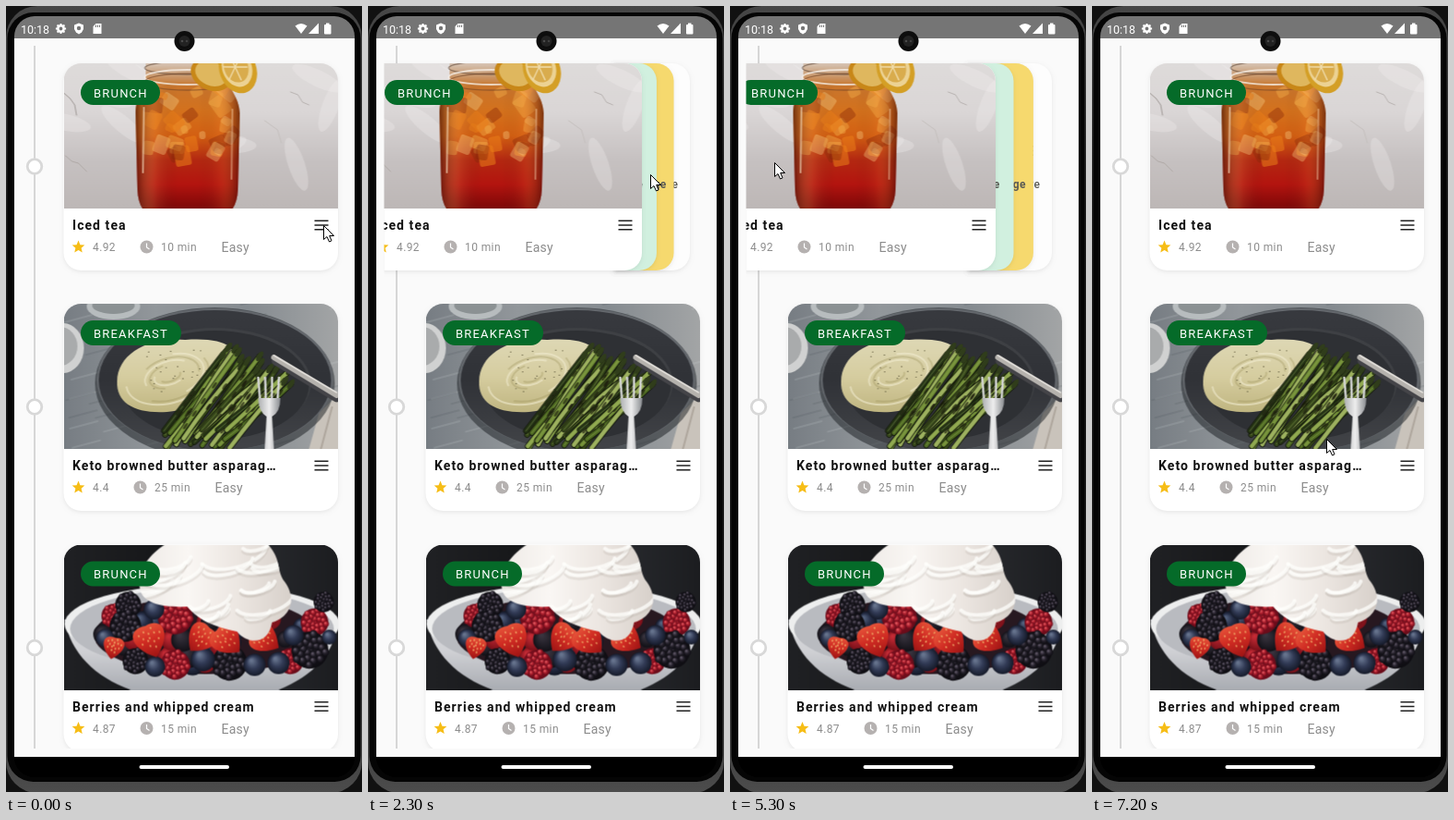
Animation of 386 by 850 pixels, one loop 7.3 s. Source, as an HTML page with a canvas:

```html
<!DOCTYPE html>
<html lang="en">
<head>
<meta charset="utf-8">
<title>Recipe timeline</title>
<style>
html, body { margin: 0; width: 100%; height: 100%; overflow: hidden; background: #111; }
canvas { display: block; width: 386px; height: 850px; }
</style>
</head>
<body>
<canvas id="stage" width="386" height="850"></canvas>
<script>
const LOOP = 7300, STEP = 100;
const PW = 298, PH = 157;
const FONT = 'Roboto, Arial, sans-serif';
const stage = document.getElementById('stage').getContext('2d');
let c = stage;

// [ms, pixels the first card is swiped]
const swipe = [[0, 0], [200, 0], [800, 102], [1000, 152], [1200, 178], [1400, 184],
  [2200, 184], [2300, 63], [2400, 16], [2500, 0], [3300, 0], [3700, 132], [3900, 180], [4000, 184],
  [5200, 184], [5300, 72], [5400, 20], [5500, 0], [5700, 0], [6000, 125], [6200, 180], [6300, 184],
  [6600, 184], [6700, 68], [6800, 18], [6900, 0]];
// [ms, x, y] of the pointer tip
const pointer = [[0, 344, 237], [100, 344, 237], [800, 167, 243], [1000, 112, 240], [1500, 110, 236],
  [1900, 150, 225], [2200, 306, 183], [2300, 306, 182], [2600, 306, 182], [3100, 325, 166],
  [3300, 322, 166], [3800, 178, 170], [4100, 178, 170], [4800, 60, 162], [5000, 48, 169],
  [5300, 48, 169], [5650, 290, 166], [6100, 185, 168], [6400, 217, 167], [6600, 217, 167], [7200, 254, 468]];

function track(keys, t, i) {
  for (let k = 1; k < keys.length; k++) {
    const a = keys[k - 1], b = keys[k];
    if (t <= b[0]) return a[i] + (b[i] - a[i]) * (t - a[0]) / (b[0] - a[0]);
  }
  return keys[keys.length - 1][i];
}

function seeded(s) {
  return () => (s = (s * 16807) % 2147483647) / 2147483647;
}

function fill(color) { c.fillStyle = color; c.fill(); }
function stroke(color, w) { c.strokeStyle = color; c.lineWidth = w; c.stroke(); }
function box(x, y, w, h, r, color) {
  c.beginPath(); c.roundRect(x, y, w, h, r);
  if (color) fill(color);
}
function oval(x, y, rx, ry, color, rot = 0) {
  c.beginPath(); c.ellipse(x, y, rx, ry, rot, 0, 7);
  if (color) fill(color);
}
function line(color, w, ...p) {
  c.beginPath(); c.moveTo(p[0], p[1]);
  for (let i = 2; i < p.length; i += 2) c.lineTo(p[i], p[i + 1]);
  stroke(color, w);
}
function poly(color, ...p) {
  c.beginPath(); c.moveTo(p[0], p[1]);
  for (let i = 2; i < p.length; i += 2) c.lineTo(p[i], p[i + 1]);
  c.closePath(); fill(color);
}
function stops(g, colors) {
  colors.forEach((s, i) => g.addColorStop(i / (colors.length - 1), s));
  return g;
}
function down(y0, y1, ...colors) { return stops(c.createLinearGradient(0, y0, 0, y1), colors); }
function across(x0, x1, ...colors) { return stops(c.createLinearGradient(x0, 0, x1, 0), colors); }
function ball(x, y, r, ...colors) {
  oval(x, y, r, r, stops(c.createRadialGradient(x - r * .3, y - r * .4, r * .1, x, y, r), colors));
}
function text(s, x, y, size, weight, color, gap) {
  c.font = `${weight} ${size}px ${FONT}`;
  c.letterSpacing = gap + 'px';
  c.fillStyle = color;
  c.fillText(s, x, y);
}

function photo(paint) {
  const cv = document.createElement('canvas');
  cv.width = PW; cv.height = PH;
  c = cv.getContext('2d');
  c.lineCap = 'round';
  paint();
  c = stage;
  return cv;
}

function paintTea() {
  const rnd = seeded(12);
  c.fillStyle = down(0, PH, '#dedbda', '#dad6d6', '#c6c1c1', '#bdb7b6');
  c.fillRect(0, 0, PW, PH);
  for (let i = 0; i < 12; i++) oval(rnd() * PW, rnd() * 110, 30, 9, 'rgba(240,238,238,.3)', rnd() * 3);
  line('#9e9895', 1, 0, 32, 7, 38, 12, 45, 14, 56);
  line('#b0aaa7', 1, 2, 100, 9, 106, 16, 108, 25, 117);
  line('#b9b4b2', 1, 246, 31, 254, 34, 259, 42, 266, 45);
  line('#c5c0be', 1, 218, 62, 232, 72, 236, 86);

  // jar
  c.save();
  c.beginPath();
  c.moveTo(89, 0); c.lineTo(89, 20);
  c.bezierCurveTo(87, 31, 78, 36, 78, 54);
  c.lineTo(80, 136); c.quadraticCurveTo(81, 157, 91, 162);
  c.lineTo(178, 162); c.quadraticCurveTo(188, 156, 189, 136);
  c.lineTo(191, 54);
  c.bezierCurveTo(190, 36, 181, 32, 180, 20);
  c.lineTo(180, 0); c.clip();
  c.fillStyle = down(0, PH, '#b98559', '#c9752c', '#d4711c', '#d35f12', '#b32811', '#b3140f', '#7c0808');
  c.fillRect(70, 0, 130, PH);
  for (let i = 0; i < 34; i++) {
    c.save();
    c.translate(88 + rnd() * 94, 24 + rnd() * 78);
    c.rotate(rnd() * 3);
    const w = 7 + rnd() * 15;
    box(-w / 2, -w / 2, w, w * .8, 3,
      ['rgba(246,178,75,.4)', 'rgba(132,38,8,.4)', 'rgba(235,127,25,.55)', 'rgba(253,214,142,.35)'][i % 4]);
    c.restore();
  }
  c.fillStyle = across(78, 191, 'rgba(60,10,0,.65)', 'rgba(255,190,110,.12)', 'rgba(0,0,0,0)', 'rgba(0,0,0,0)', 'rgba(255,140,60,.1)', 'rgba(60,5,0,.6)');
  c.fillRect(70, 20, 130, PH);
  c.fillStyle = down(0, 25, 'rgba(225,218,212,.75)', 'rgba(215,195,175,.45)', 'rgba(220,180,130,0)');
  c.fillRect(80, 0, 110, 25);
  line('rgba(255,238,210,.55)', 2, 87, 48, 86, 118);
  line('rgba(255,225,190,.4)', 2, 183, 50, 182, 125);
  c.restore();

  oval(134, 5, 46, 7); stroke('rgba(105,82,65,.65)', 1.3);
  oval(134, 15, 46, 8); stroke('rgba(248,243,236,.75)', 1.8);
  oval(134, 20, 46, 9); stroke('rgba(116,68,37,.55)', 1.3);

  // lemon
  oval(160, 12, 23, 17, '#c88718', .4);
  oval(160, 11, 18, 13, '#dfb75e', .4);
  oval(189, 7, 20, 26, '#d49f26', -.35);
  oval(188, 5, 16, 21, '#ecd293', -.35);
  oval(187, 4, 13, 17, '#d9ac4d', -.35);
  for (let a = 0; a < 6; a++) line('#f0dcab', 1.3, 186, 4, 186 + 13 * Math.cos(a * 1.05), 4 + 16 * Math.sin(a * 1.05));
}

function paintAsparagus() {
  const rnd = seeded(77);
  c.fillStyle = across(0, PW, '#777d83', '#92979b', '#858b90', '#a3a5a6');
  c.fillRect(0, 0, PW, PH);
  for (let i = 0; i < 50; i++) {
    const x = rnd() * PW, y = rnd() * PH;
    line(i % 2 ? 'rgba(55,63,69,.12)' : 'rgba(225,230,232,.13)', 2, x, y, x + 30, y - 8);
  }
  oval(54, 3, 29, 14, '#b7bcbe'); oval(54, 2, 23, 9, '#8b9193');
  oval(-1, 48, 23, 27, '#d0d1d1'); oval(-4, 46, 19, 21, '#a9abac');
  poly('#c9c3bb', 298, 98, 277, 118, 266, 157, 298, 157);
  line('#aea69d', 2, 291, 112, 279, 157);

  oval(164, 86, 130, 82, 'rgba(25,28,32,.5)');
  oval(164, 82, 128, 77, '#64686d');
  oval(164, 83, 126, 76, down(5, PH, '#383a3f', '#303237', '#424448'));
  oval(164, 86, 104, 60, '#3e4044');
  oval(164, 88, 102, 59, '#2e3034');

  // mash
  c.beginPath();
  c.moveTo(58, 84);
  c.bezierCurveTo(58, 54, 93, 35, 132, 39);
  c.bezierCurveTo(175, 36, 194, 48, 178, 67);
  c.bezierCurveTo(162, 88, 147, 115, 112, 117);
  c.bezierCurveTo(78, 119, 57, 108, 58, 84);
  fill(down(38, 118, '#ded8b5', '#d6cda0', '#bfb580'));
  for (let i = 0; i < 8; i++) {
    c.beginPath(); c.ellipse(115, 78, 12 + i * 5.2, 6 + i * 3.3, -.3, i, i + 2.5);
    stroke(i % 2 ? 'rgba(242,237,210,.55)' : 'rgba(150,139,84,.3)', 2);
  }
  for (let i = 0; i < 26; i++) oval(90 + rnd() * 70, 50 + rnd() * 50, .7, .7, '#6a6546');

  // asparagus
  const greens = ['#354619', '#6f8b35', '#253415', '#8ba44c', '#4f6b22', '#99ad5c'];
  for (let i = 0; i < 30; i++) {
    const x0 = 103 + i * 2.4 + rnd() * 10, y0 = 133 + rnd() * 23;
    const x1 = 166 + i * 2.4 + rnd() * 16, y1 = 42 + i * 1.1 + rnd() * 22;
    const bend = (rnd() - .5) * 15;
    c.beginPath(); c.moveTo(x0, y0);
    c.quadraticCurveTo((x0 + x1) / 2 + bend, (y0 + y1) / 2, x1, y1);
    stroke('rgba(20,27,10,.8)', 6.5);
    stroke(greens[i % 6], 4.5);
    stroke('rgba(185,204,115,.3)', 1);
    oval(x1, y1, 2.8, 6, '#303d1b', .6);
    for (let k = 0; k < 4; k++) {
      const f = .15 + rnd() * .7;
      oval(x0 + (x1 - x0) * f, y0 + (y1 - y0) * f, 1.4, 4, 'rgba(27,28,14,.65)', .6);
    }
  }

  // knife and fork
  line('#444448', 9, 230, 62, 296, 102);
  line('#b5b2ad', 6, 228, 58, 296, 99);
  line('#e2dfda', 1.5, 228, 56, 296, 96);
  for (let k = 0; k < 4; k++) line('#d6d7d8', 2.4, 211 + k * 7.5, 80, 213 + k * 6.3, 105);
  c.beginPath(); c.moveTo(211, 102); c.lineTo(235, 102);
  c.quadraticCurveTo(235, 117, 226, 122); c.lineTo(228, 157); c.lineTo(218, 157);
  c.lineTo(220, 122); c.quadraticCurveTo(211, 116, 211, 102);
  fill(across(211, 235, '#aeb0b2', '#eeeeee', '#898c90'));
}

function drupes(x, y, r, colors) {
  ball(x, y, r, colors[0], colors[1]);
  for (let k = 0; k < 24; k++) {
    const a = k * 2.4, d = r * .9 * Math.sqrt(k / 24);
    ball(x + d * Math.cos(a), y + d * Math.sin(a), r * .21, colors[2], colors[0], colors[1]);
  }
}
function strawberry(x, y, r, rot) {
  c.save(); c.translate(x, y); c.rotate(rot);
  c.beginPath(); c.moveTo(0, r);
  c.bezierCurveTo(-r * 1.3, 0, -r, -r, 0, -r * .8);
  c.bezierCurveTo(r, -r, r * 1.3, 0, 0, r);
  fill(down(-r, r, '#e95a3d', '#d02c23', '#9e1414'));
  for (let k = 0; k < 14; k++) {
    const a = k * 2.4, d = r * .65 * Math.sqrt(k / 14);
    oval(d * Math.cos(a), d * Math.sin(a) - 2, .8, 1.2, '#efab68');
  }
  c.restore();
}

function paintBerries() {
  const rnd = seeded(31);
  c.fillStyle = across(0, PW, '#202124', '#17181a', '#292b2f', '#1c1d20');
  c.fillRect(0, 0, PW, PH);
  // bowl
  c.beginPath(); c.moveTo(1, 81);
  c.bezierCurveTo(8, 120, 38, 147, 82, 160);
  c.lineTo(225, 160); c.bezierCurveTo(268, 145, 294, 119, 298, 82);
  c.closePath(); fill(down(75, PH, '#dedfe1', '#cfd0d4', '#a9acb2'));
  oval(150, 86, 149, 43, '#edeeee');
  oval(150, 91, 143, 44, '#b9bbc0');
  oval(154, 98, 121, 42, '#271820');

  for (let i = 0; i < 40; i++) {
    const a = rnd() * 6.28, d = Math.sqrt(rnd());
    ball(154 + 112 * d * Math.cos(a), 94 + 38 * d * Math.sin(a), 9 + rnd() * 4,
      ...[['#53617d', '#272f48', '#121724'], ['#c42b35', '#791019'], ['#39343f', '#111016']][i % 3]);
  }
  const rasp = ['#a91d2c', '#680b19', '#e45d62'], black = ['#25212b', '#0e0d12', '#625a69'];
  [[54, 77, 13], [121, 78, 19], [121, 130, 16], [272, 84, 15], [246, 126, 14]].forEach(b => drupes(...b, rasp));
  [[70, 65, 14], [67, 88, 17], [78, 126, 14], [180, 128, 19], [267, 114, 20], [282, 62, 11]].forEach(b => drupes(...b, black));
  [[98, 70, 11], [45, 101, 10], [99, 132, 11], [151, 124, 13], [207, 130, 12], [233, 128, 12], [288, 100, 8], [249, 98, 11]]
    .forEach(b => ball(...b, '#66738d', '#323b56', '#151a29'));
  strawberry(94, 103, 20, -.35);
  strawberry(54, 111, 13, .2);
  strawberry(149, 101, 18, .7);
  strawberry(177, 103, 19, -.8);
  strawberry(218, 102, 18, -1);

  // cream
  c.beginPath(); c.moveTo(83, 49);
  c.bezierCurveTo(78, 27, 95, 8, 116, -4);
  c.lineTo(218, -4);
  c.bezierCurveTo(237, 15, 230, 24, 238, 38);
  c.bezierCurveTo(256, 60, 243, 80, 226, 84);
  c.bezierCurveTo(222, 109, 199, 108, 188, 94);
  c.bezierCurveTo(163, 89, 146, 81, 134, 67);
  c.bezierCurveTo(108, 68, 87, 64, 83, 49);
  fill(across(80, 245, '#eeeae6', '#faf7f4', '#ece6e1', '#d8d1cb'));
  c.save(); c.clip();
  for (let i = 0; i < 22; i++) {
    const x = 88 + rnd() * 145, y = rnd() * 92, w = 14 + rnd() * 24;
    c.beginPath(); c.ellipse(x, y, w, w * .45, -.25, .2, 2.9);
    stroke('rgba(173,162,153,.22)', 4);
    c.beginPath(); c.ellipse(x, y - 3, w, w * .45, -.25, .2, 2.9);
    stroke('rgba(255,255,253,.75)', 4);
  }
  c.restore();
}

const cards = [
  { y: 62, tag: 'BRUNCH', tagW: 86, title: 'Iced tea', rate: '4.92', time: '10 min', dx: 0, pic: photo(paintTea) },
  { y: 322, tag: 'BREAKFAST', tagW: 109, title: 'Keto browned butter asparag…', rate: '4.4', time: '25 min', dx: -7, pic: photo(paintAsparagus) },
  { y: 582.5, tag: 'BRUNCH', tagW: 86, title: 'Berries and whipped cream', rate: '4.87', time: '15 min', dx: 0, pic: photo(paintBerries) }
];

function burger(x, y) {
  for (let k = -1; k < 2; k++) line('#202020', 1.6, x - 7.5, y + k * 4.7, x + 7.5, y + k * 4.7);
}

function shadowed(draw) {
  c.save();
  c.shadowColor = 'rgba(0,0,0,.08)'; c.shadowBlur = 4; c.shadowOffsetY = 1.5;
  draw();
  c.restore();
}

function drawCard(card, shift) {
  c.save();
  c.translate(-shift, card.y);
  shadowed(() => box(62.5, 0, 297.5, 224, 19, '#fff'));
  c.save();
  box(62.5, 0, 297.5, 224, 19); c.clip();
  c.drawImage(card.pic, 62.5, 0);
  c.restore();
  box(81, 18, card.tagW, 27, 13.5, '#056b29');
  text(card.tag, 95, 36.5, 13, 400, '#fff', 1.2);
  text(card.title, 72, 180, 14, 700, '#111', 1.05);
  burger(342, 175);

  const star = [];
  for (let i = 0; i < 10; i++) {
    const r = i % 2 ? 3.3 : 7.2, a = i * Math.PI / 5 - Math.PI / 2;
    star.push(78.5 + r * Math.cos(a), 198.8 + r * Math.sin(a));
  }
  poly('#f6bd16', ...star);
  text(card.rate, 94, 203, 12, 400, '#8c8c8c', .4);
  const x = 152.5 + card.dx;
  oval(x, 198.5, 7, 7, '#b5b1b0');
  line('#fff', 1.2, x, 194.5, x, 199, x + 3, 201);
  text(card.time, x + 15.5, 203, 12, 400, '#8c8c8c', .4);
  text('Easy', x + 81, 204, 14, 400, '#8c8c8c', .25);
  c.restore();
}

function panel(edge, left, color) {
  shadowed(() => box(left, 62, edge - left, 224, [0, 19, 19, 0], color));
}
function label(s, x, right) {
  c.textAlign = 'center';
  text(s, x, 197, 12, right ? 500 : 700, '#5a5a55', .4);
  c.textAlign = 'left';
}
function ring(x, color, dashes) {
  c.setLineDash(dashes);
  oval(x, 156.5, 7, 7); stroke(color, 1.4);
  c.setLineDash([]);
}

function drawActions(shift) {
  const left = 360 - shift - 30;
  const yellow = 350 - .293 * shift, green = 351 - .604 * shift;
  panel(349, left, '#fdfdfd');
  burger(321, 156.5);
  label('More', 321.5, true);
  panel(yellow, left, '#f6d96e');
  ring(yellow - 30, '#b8871d', [8, 3]);
  label('Change', yellow - 29.7);
  panel(green, left, '#d1f0df');
  ring(green - 30, '#31a24c', [9, 2]);
  line('#238b3d', 1.6, green - 33.5, 156, green - 30.5, 159.5, green - 24, 152);
  label('Done', green - 29.5);
}

function drawFrame() {
  c.fillStyle = '#111'; c.fillRect(0, 0, 386, 850);
  box(0, 0, 386, 851, 34, down(0, 850, '#474747', '#1d1d1d', '#181818', '#1d1d1d', '#4c4c4c'));
  box(1.5, 7, 383, 832, 28, '#050505');
  box(9, 11, 369, 823, 22, '#000');
}

function drawStatus() {
  c.fillStyle = '#757575'; c.fillRect(9, 11, 369, 24);
  text('10:18', 16, 29.5, 12.5, 400, '#fff', 0);
  oval(59.5, 24.5, 3.2, 3.2); stroke('#fff', 2.6);
  for (let k = 0; k < 8; k++) {
    const a = k * Math.PI / 4, x = Math.cos(a), y = Math.sin(a);
    line('#fff', 1.9, 59.5 + x * 4, 24.5 + y * 4, 59.5 + x * 5.6, 24.5 + y * 5.6);
  }
  poly('#fff', 79, 18.5, 84, 20.5, 84, 25, 82, 28.5, 79, 30.5, 76, 28.5, 74, 25, 74, 20.5);
  oval(79, 24, 2.2, 2.2, '#757575');
  poly('#fff', 97.5, 19, 103.5, 19, 103.5, 30, 94.5, 30, 94.5, 22);
  for (let k = 0; k < 3; k++) line('#757575', 1, 97.5 + k * 2, 20.5, 97.5 + k * 2, 23);
  c.beginPath(); c.moveTo(320, 30); c.lineTo(313.5, 21.5);
  c.quadraticCurveTo(320, 16.5, 326.5, 21.5); c.closePath(); fill('#fff');
  poly('#fff', 339, 18.5, 339, 30, 328, 30);
  box(345, 20, 7.5, 10.5, 1, '#fff');
  box(347, 18.5, 3.5, 2, 0, '#fff');
}

function drawPointer(x, y) {
  c.save();
  c.translate(x + .5, y + .5);
  poly('#fff', 0, 0, 0, 15, 3.5, 12, 6, 17.5, 8.5, 16.3, 6.2, 11, 11, 11);
  c.lineJoin = 'miter';
  stroke('#000', 1);
  c.restore();
}

function draw(t) {
  const shift = track(swipe, t, 1);
  drawFrame();
  c.save();
  box(9, 11, 369, 823, 22); c.clip();
  c.fillStyle = '#fafafa'; c.fillRect(9, 35, 369, 777);
  line('#d6d6d6', 2, 31, 43, 31, 803);
  for (const y of [173.5, 433.5, 694]) {
    oval(31, y, 7.8, 7.8, '#fff'); stroke('#d8d8d8', 2.8);
  }
  c.save();
  c.beginPath(); c.rect(17.5, 43, 350, 760); c.clip();
  if (shift > 0) drawActions(shift);
  cards.forEach((card, i) => drawCard(card, i ? 0 : shift));
  c.restore();
  drawStatus();
  c.fillStyle = '#000'; c.fillRect(9, 812, 369, 24);
  box(144.5, 821, 97.5, 4, 2, '#fff');
  c.restore();
  oval(193.5, 38, 11, 11, '#0d0d0d');
  oval(193.5, 38, 6, 6, '#222');
  oval(191, 38, 1.3, 1.3, '#4a4a4a');
  oval(196, 38, 1.3, 1.3, '#404040');
  drawPointer(Math.round(track(pointer, t, 1)), Math.round(track(pointer, t, 2)));
}

const start = performance.now();
function tick() {
  const t = (performance.now() - start) % LOOP;
  draw(Math.floor(t / STEP) * STEP);
  requestAnimationFrame(tick);
}
tick();
</script>
</body>
</html>
```
